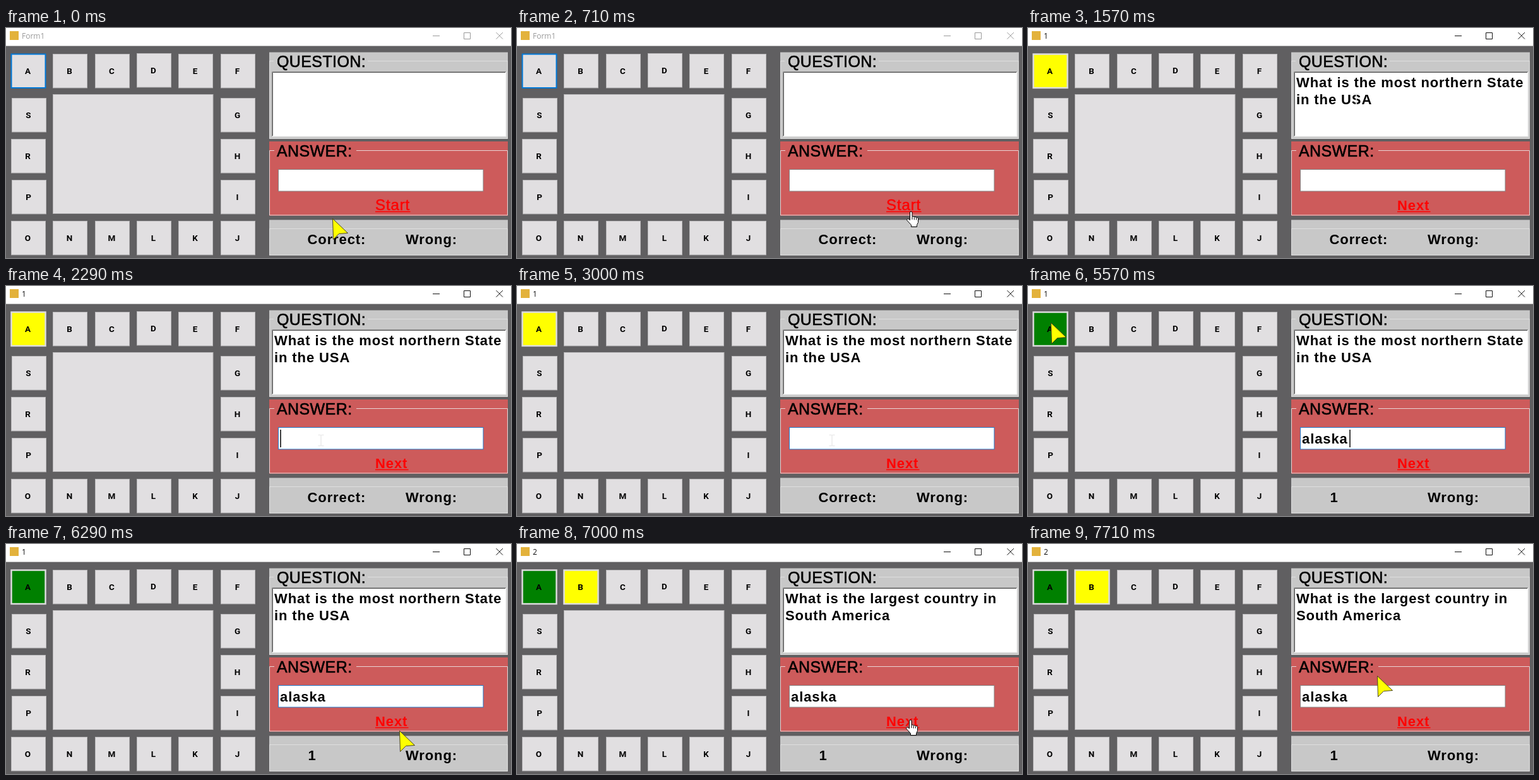
These frames come from a looping animation (800x365 px, 8000 ms). An HTML page:

```html
<!DOCTYPE html>
<html lang="en">
<head>
<meta charset="utf-8">
<title>Quiz form</title>
<style>
html, body { margin: 0; width: 100%; height: 100%; overflow: hidden; background: #605f61; }
svg { display: block; }
text { font: bold 22px "Liberation Sans", Arial, sans-serif; letter-spacing: .9px; white-space: pre; }
.title { font: 12px "Open Sans", sans-serif; letter-spacing: 0; }
.head { font-weight: 400; font-size: 25px; letter-spacing: .4px; stroke: #000; stroke-width: .6; }
.key { font: bold 13.5px Roboto, sans-serif; letter-spacing: 0; text-anchor: middle; }
.link { fill: #f00; }
.link.thin { font-weight: 400; font-size: 24px; stroke: #f00; stroke-width: .5; }
</style>
</head>
<body>
<svg id="stage" width="800" height="365" viewBox="0 0 800 365">
  <rect width="800" height="365" fill="#605f61"/>
  <rect width="800" height="28.5" fill="#fff"/>
  <rect x="6" y="5" width="14" height="14" fill="#e3b23c"/>
  <text id="title" class="title" x="25" y="17"></text>
  <path id="controls" fill="none" d="M676 12.5h11M725.5 7.5h10v10h-10zM776.5 7l10.5 10.5M787 7l-10.5 10.5"/>
  <g id="keys"></g>
  <rect x="74.500" y="105.500" width="253.500" height="189" fill="#e1dfe1" stroke="#b4b3b5"/>

  <rect x="417" y="38.500" width="378" height="137.500" fill="#c8c8c8"/>
  <path d="M417 52.500h7M573 52.500h222M417.500 52v123.500h377V52" fill="none" stroke="#dedede"/>
  <text class="head" x="429" y="62">QUESTION:</text>
  <rect x="421" y="69" width="371.500" height="103.500" fill="#f4f4f4"/>
  <path d="M421.500 172V69.500H792" fill="none" stroke="#8a8a8a"/>
  <path d="M422.500 171V70.500H791" fill="none" stroke="#5f5f5f"/>
  <rect x="423" y="71" width="368" height="100" fill="#fff"/>
  <text id="line1" x="425" y="94"></text>
  <text id="line2" x="425" y="121"></text>

  <rect x="417" y="180" width="378" height="118" fill="#cd5b5b"/>
  <path d="M425 194.500h-7.500v102.500h377V194.500H555" fill="none" stroke="#ead5d5"/>
  <text class="head" x="429" y="203.500">ANSWER:</text>
  <rect id="box" x="431.500" y="224.500" width="324.500" height="34.500" fill="#fff"/>
  <text id="answer" x="434" y="250"></text>
  <path id="caret" stroke="#000" stroke-width="1.500"/>
  <text id="link" class="link" x="585" y="289"></text>
  <path id="underline" stroke="#f00" stroke-width="1.500"/>

  <rect x="417" y="304.500" width="378" height="56.500" fill="#c8c8c8"/>
  <path d="M417.500 318.500h377v42h-377z" fill="none" stroke="#dedede"/>
  <text id="score" y="342.500"></text>
  <text x="633" y="342.500">Wrong:</text>
  <g id="cursor"></g>
</svg>
<script>
const $ = id => document.getElementById(id);
const LOOP = 8000;

// Letter keys: label, left, top
const keys = [
  ..."ABCDEF".split("").map((c, i) => [c, [8, 74, 141, 207, 273, 340][i], c === "D" ? 40 : 41]),
  ..."SRP".split("").map((c, i) => [c, [9, 8, 9][i], 111 + 65 * i]),
  ..."GHI".split("").map((c, i) => [c, 340, 111 + 65 * i]),
  ..."ONMLKJ".split("").map((c, i) => [c, [8, 74, 141, 207, 273, 340][i], 306])
];
$("keys").innerHTML = keys.map(([c, x, y]) =>
  `<rect id="key${c}" x="${x + .5}" y="${y + .5}" width="54" height="53.5" fill="#e1dfe1" stroke="#b9b8ba"/>
   <text class="key" x="${x + 26.5}" y="${y + 31.5}">${c}</text>`).join("");

const shapes = {
  arrow: `<path d="M.5 .5 24.500 23.500 10.500 24.500 1.500 33.500z" fill="#ff0" stroke="#4a4520"/>`,
  hand: `<path d="M5.500 2q0-1.800 1.700-1.800T9 2v6.500q1.800-1.500 3.300.5 1.800-1 3 .8 2.700-.8 3.200 1.700v6l-2 4v3h-9v-3L1 14.500q-1-2 .7-2.700 1.700-.3 3.800 2z" fill="#fff" stroke="#000"/><path d="M9 9v4M12.300 9.500v4M15.500 10.500v3" stroke="#000"/>`,
  beam: `<path d="M-4.500-8.500h3.500l1 1 1-1h3.500M0-7.500v15M-4.500 8.500h3.500l1-1 1 1h3.500" fill="none" stroke="#ececec" stroke-width="1.500"/>`
};

const first = ["What is the most northern State", "in the USA"];
const second = ["What is the largest country in", "South America"];

// Each step changes only the listed values; later steps inherit the rest
const steps = [
  [0, { title: "Form1", active: false, A: "focus", B: "", lines: ["", ""], link: "Start", answer: "",
        focus: false, caret: 0, score: "Correct:", cursor: ["arrow", 517, 302] }],
  [290, { cursor: ["arrow", 540, 203] }],
  [570, { cursor: ["hand", 617, 289] }],
  [710, { cursor: ["hand", 617, 291] }],
  [1000, { title: "1", active: true, A: "yellow", lines: first, link: "Next", cursor: ["arrow", 622, 301] }],
  [1290, { cursor: ["beam", 600, 110] }],
  [1570, { cursor: ["beam", 520, 113] }],
  [1710, { cursor: ["beam", 509, 235] }],
  [2000, { cursor: ["beam", 499, 245] }],
  [2290, { focus: true, caret: 435 }],
  [2570, { caret: 0 }],
  [3570, { answer: "al", caret: 454 }],
  [3710, { answer: "alas", caret: 483 }],
  [4000, { answer: "alaska", caret: 510 }],
  [4570, { A: "green", score: "1", caret: 0 }],
  [5000, { caret: 510 }],
  [5290, { cursor: ["arrow", 499, 211] }],
  [5570, { cursor: ["arrow", 36, 58] }],
  [5710, { cursor: ["arrow", 30, 60] }],
  [6000, { caret: 0, cursor: ["arrow", 28, 56] }],
  [6290, { cursor: ["arrow", 623, 296] }],
  [6570, { cursor: ["hand", 616, 281] }],
  [6710, { cursor: ["hand", 616, 279] }],
  [7000, { title: "2", B: "yellow", lines: second, focus: false }],
  [7290, { cursor: ["beam", 600, 243] }],
  [7570, { cursor: ["arrow", 555, 212] }],
  [7710, { cursor: ["arrow", 553, 209] }]
];

const set = (id, attrs) => Object.entries(attrs).forEach(([k, v]) => $(id).setAttribute(k, v));

function paintKey(c, look) {
  const color = { yellow: "#ff0", green: "#008000" }[look];
  set("key" + c, {
    fill: color || "#e1dfe1",
    stroke: color ? "#dddcdd" : look === "focus" ? "#0078d7" : "#b9b8ba",
    "stroke-width": color ? 2.5 : look === "focus" ? 2 : 1
  });
}

function draw(s) {
  $("title").textContent = s.title;
  set("title", { fill: s.active ? "#111" : "#999" });
  set("controls", { stroke: s.active ? "#111" : "#999" });
  paintKey("A", s.A);
  paintKey("B", s.B);
  $("line1").textContent = s.lines[0];
  $("line2").textContent = s.lines[1];
  $("answer").textContent = s.answer;
  set("box", { stroke: s.focus ? "#1f7fd0" : "#858585" });
  set("caret", { d: s.caret ? `M${s.caret} 228v28` : "" });
  $("link").textContent = s.link;
  set("link", { class: s.link === "Start" ? "link thin" : "link" });
  set("underline", { d: `M585 291.500H${s.link === "Start" ? 640.5 : 637.5}` });
  $("score").textContent = s.score;
  set("score", { x: s.score === "1" ? 478.5 : 477.5 });
  const [shape, x, y] = s.cursor;
  $("cursor").innerHTML = shapes[shape];
  set("cursor", { transform: `translate(${x} ${y})` });
}

let shown = -1;
function tick() {
  const t = performance.now() % LOOP;
  const past = steps.filter(([at]) => at <= t);
  if (past.length !== shown) {
    shown = past.length;
    draw(Object.assign({}, ...past.map(([, change]) => change)));
  }
  requestAnimationFrame(tick);
}
tick();
</script>
</body>
</html>
```
